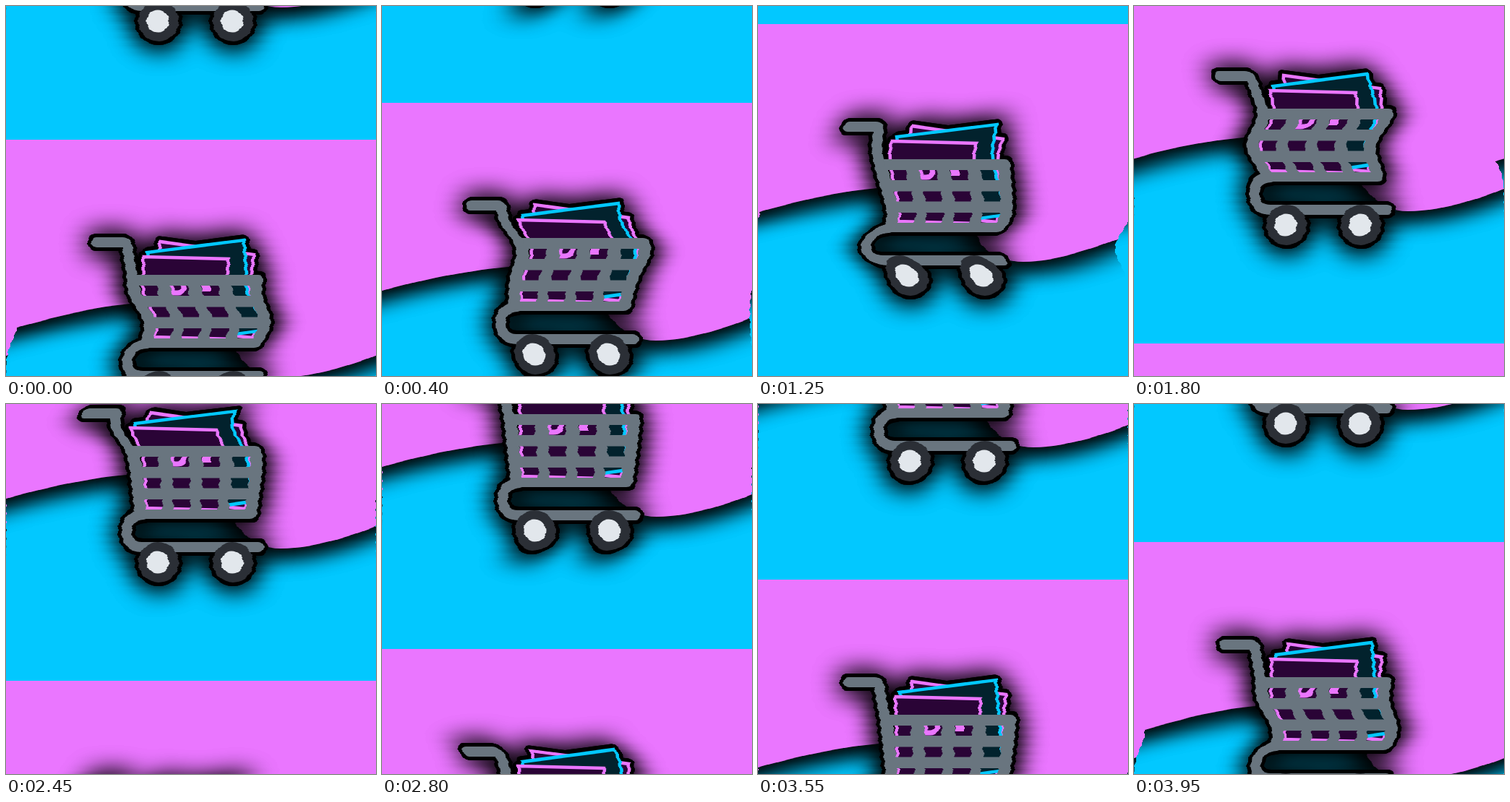
An HTML page with a canvas for the animation above (4000 ms loop, 512 by 512 pixels).

```html
<!DOCTYPE html>
<html lang="en">
<head>
<meta charset="utf-8">
<title>Rolling cart</title>
<style>
  html, body { margin: 0; width: 100%; height: 100%; overflow: hidden; background: #02c8ff; }
  canvas { display: block; width: 100vw; height: 100vh; }
</style>
</head>
<body>
<canvas id="stage" width="512" height="512"></canvas>
<script>
const SIZE = 512, LOOP = 4000, STEP = 50;
const PINK = '#ea76ff', BLUE = '#02c8ff', GREY = '#69757f', DARK = '#2b2f36',
      PALE = '#e2e7ec', PURPLE = '#2a0436', TEAL = '#02222d';

const mod = (n, m) => ((n % m) + m) % m;
const bell = (d, spread) => Math.exp(-d * d / (2 * spread * spread));

function layer() {
  const c = document.createElement('canvas');
  c.width = c.height = SIZE;
  const g = c.getContext('2d');
  g.lineCap = g.lineJoin = 'round';
  return g;
}

const handle = new Path2D('M125 142 H161 Q167 142 168 149 L171 168 L176 192');
const chassis = new Path2D('M190 282 Q167 284 167 305 Q167 327 189 327 H350');
const basket = 'M168 187 H350 Q358 187 357 196 L354 228 L347 281 Q346 288 338 288 H186 Q179 288 178 280 Z';
const papers = [
  { path: new Path2D('M213 141 L343 159 L331 274 L205 262 Z'), line: PINK, fill: PURPLE },
  { path: new Path2D('M196 156 L329 139 L340 264 L215 282 Z'), line: BLUE, fill: TEAL },
  { path: new Path2D('M190 162 L308 165 L303 276 L194 273 Z'), line: PINK, fill: PURPLE }
];
const wheels = [211, 314];

// Openings of the basket, narrowing towards the bottom.
let holes = '';
for (let row = 0; row < 3; row++) {
  for (let col = 0; col < 4; col++) {
    const x = 187 + 2.5 * row + col * (42.5 - 2 * row);
    holes += `M${x} ${202 + 29.5 * row}h25l-1 14h-22Z`;
  }
}

function disc(g, x, y, r, color) {
  g.fillStyle = color;
  g.beginPath();
  g.arc(x, y, r, 0, Math.PI * 2);
  g.fill();
}

function stroke(g, path, width, color) {
  g.lineWidth = width;
  g.strokeStyle = color;
  g.stroke(path);
}

function drawOutline(g) {
  const body = new Path2D(basket);
  stroke(g, handle, 24, '#000');
  stroke(g, chassis, 24, '#000');
  stroke(g, body, 10, '#000');
  g.fill(body);
  for (const p of papers) {
    stroke(g, p.path, 15, '#000');
    g.fill(p.path);
  }
  for (const x of wheels) disc(g, x, 348, 33, '#000');
}

function drawCart(g) {
  g.lineJoin = 'miter';
  for (const p of papers) {
    g.fillStyle = p.fill;
    g.fill(p.path);
    stroke(g, p.path, 4.5, p.line);
  }
  g.lineCap = 'butt';
  stroke(g, new Path2D('M231 196 V212 H238 Q249 212 249 196'), 7, PINK);
  stroke(g, new Path2D('M273 206 H285'), 8, PINK);

  g.lineCap = g.lineJoin = 'round';
  g.fillStyle = GREY;
  g.fill(new Path2D(basket + holes), 'evenodd');
  stroke(g, handle, 14, GREY);
  stroke(g, chassis, 14, GREY);
  for (const x of wheels) {
    disc(g, x, 348, 28, DARK);
    disc(g, x - 1, 348, 15.5, PALE);
  }
}

function drawArt() {
  const g = layer();
  g.fillStyle = BLUE;
  g.fillRect(0, 0, SIZE, SIZE);

  const hill = new Path2D('M-80 284 L0 260 C60 243 130 228 185 226 ' +
    'C320 224 300 329 380 329 C430 329 490 307 512 298 L600 262 V-80 H-80 Z');
  g.fillStyle = PINK;
  g.shadowColor = '#000';
  g.shadowBlur = 32;
  g.shadowOffsetY = 8;
  g.fill(hill);
  g.fill(hill);

  const outline = layer();
  drawOutline(outline);
  g.shadowBlur = 36;
  g.shadowOffsetY = 2;
  g.drawImage(outline.canvas, 0, 0);
  g.drawImage(outline.canvas, 0, 0);
  g.shadowColor = 'transparent';
  drawCart(g);
  return g.canvas;
}

// Sideways tears climb the screen at twice the speed of the picture.
const ROLL = SIZE / LOOP, CLIMB = 2 * ROLL;
const tears = [
  { y: 655, spread: 21, push: () => -18 },
  { y: 440, spread: 21, push: a => 16 * Math.tanh(3 * Math.cos(a - 0.86)) },
  { y: 530, spread: 28, push: a => -10 * Math.sin(a / 2) }
];

function shiftAt(y, t) {
  const angle = 2 * Math.PI * t / LOOP;
  let dx = 0.7 * Math.sin(y * 0.55);
  for (const tear of tears) {
    const d = mod(y - tear.y + CLIMB * t + SIZE / 2, SIZE) - SIZE / 2;
    // A weak recoil runs ahead of each tear.
    dx += tear.push(angle) * (bell(d, tear.spread) - 0.2 * bell(d + 45, 16));
  }
  return Math.round(dx);
}

const art = drawArt();
const screen = document.getElementById('stage').getContext('2d');

function draw(t) {
  const seam = Math.round(185 - ROLL * t);
  for (let y = 0; y < SIZE; y++) {
    const row = mod(y - seam, SIZE);
    const dx = shiftAt(y, t);
    screen.drawImage(art, 0, row, SIZE, 1, dx, y, SIZE, 1);
    if (dx) screen.drawImage(art, 0, row, SIZE, 1, dx - Math.sign(dx) * SIZE, y, SIZE, 1);
  }
}

const start = performance.now();
let last = -1;

function tick() {
  const t = Math.floor(mod(performance.now() - start, LOOP) / STEP) * STEP;
  if (t !== last) draw(last = t);
  requestAnimationFrame(tick);
}
tick();
</script>
</body>
</html>
```
